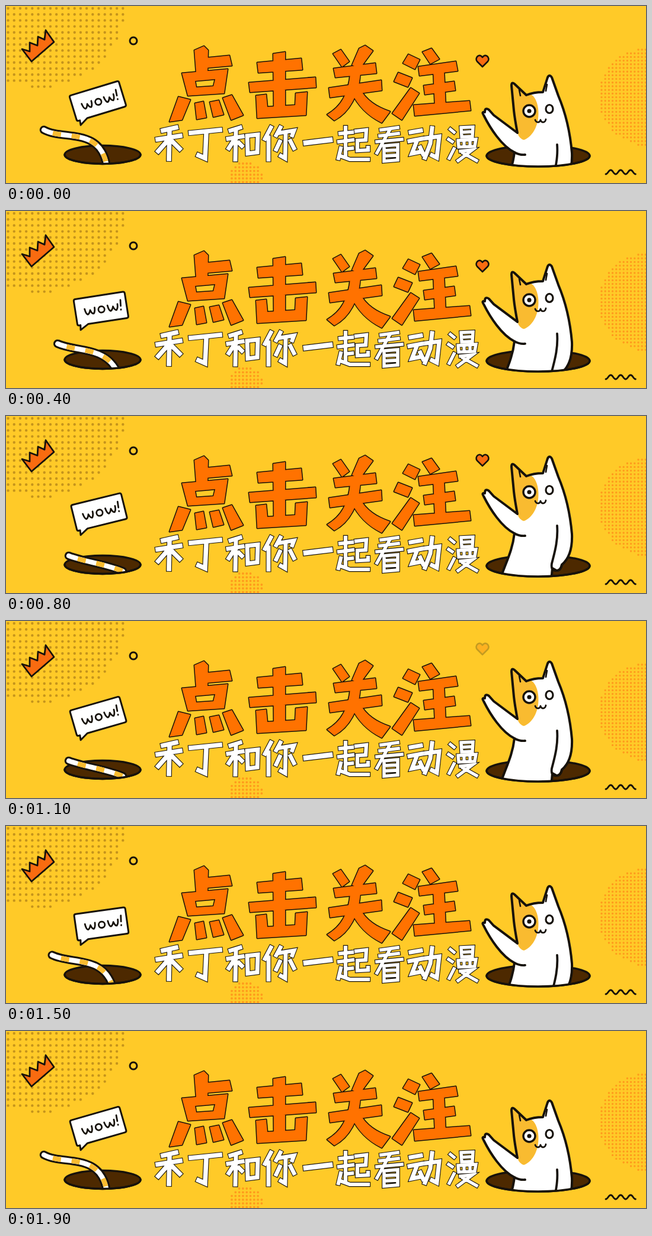
An HTML page for the animation above (2000 ms loop, 1080 px wide and 300 px high).

```html
<!DOCTYPE html>
<html lang="zh">
<head>
<meta charset="utf-8">
<title>点击关注</title>
<style>
html, body { margin: 0; width: 100%; height: 100%; overflow: hidden; background: #ffca28; }
svg { display: block; width: 1080px; height: 300px; }
.ink { fill: none; stroke: #17120b; stroke-width: 3.4; stroke-linecap: round; stroke-linejoin: round; }
.hole { fill: #4d2900; stroke: #17120b; stroke-width: 3.4; }
#title { stroke-linejoin: round; }
#line path { fill: none; stroke-linecap: square; stroke-linejoin: miter; stroke-width: calc(var(--w, 7.6px) + var(--edge)); }
.edge { --edge: 2.2px; stroke: #17120b; }
.face { --edge: 0px; stroke: #fff; }
#tail path { fill: none; stroke-linecap: round; }
</style>
</head>
<body>
<svg viewBox="0 0 1080 300" role="img" aria-label="点击关注 禾丁和你一起看动漫 wow!">
  <defs>
    <clipPath id="inLeft"><path d="M0 0H300V252H227A64 15.5 0 0 1 99 252H0Z"/></clipPath>
    <clipPath id="inRight"><path d="M780 0H1080V254H985A87 18 0 0 1 811 254H780Z"/></clipPath>
    <path id="body" d="M863 166C860 150 858 138 857 128L853 86Q853 79 858 83L878 102Q890 97 906 97L914 72Q917 66 921 72L932 103C943 129 952 165 955 200C956 225 950 242 938 252Q936 262 929 262L922 258L920 280H833C842 250 854 232 858 199C836 188 817 158 806 136Q802 130 808 131Q808 122 815 127L823 136Z"/>
    <clipPath id="inBody"><use href="#body"/></clipPath>

    <g id="title">
      <!-- 点 -->
      <path d="M318 75L334 68 341 75 340 113 321 114ZM337 88L377 84 381 101 337 105Z"/>
      <path fill-rule="evenodd" d="M297 114L374 107 368 148 307 152ZM319 127L353 124 350 136 321 138Z"/>
      <path d="M291 154L311 159 297 193 276 196ZM319 165L333 162 338 189 322 192ZM344 163L359 160 367 184 350 188ZM366 156L381 151 400 185 380 193Z"/>
      <!-- 击 -->
      <path d="M451 81L471 78 471 178 452 180ZM424 96L498 89 500 108 426 113ZM410 130L522 121 523 138 412 146Z"/>
      <path d="M422 152L439 150 441 171 488 168 489 148 508 146 506 185 424 190Z"/>
      <!-- 关 -->
      <path d="M552 81L565 74 579 94 567 103ZM596 72L606 67 619 76 597 106 584 100ZM553 106L623 97 625 114 556 121ZM545 139L633 126 634 143 547 155Z"/>
      <path d="M581 114L598 112C596 150 580 180 554 194L542 184C566 170 578 148 581 114ZM583 146L597 140C608 160 625 171 648 179L634 198C610 186 594 170 583 146Z"/>
      <!-- 注 -->
      <path d="M679 82L698 91 690 107 670 97ZM662 113L685 122 678 137 655 128ZM652 182L683 139 697 148 668 193Z"/>
      <path d="M703 78L718 72 731 90 716 98ZM696 103L759 94 762 110 698 118ZM705 135L756 128 758 143 707 150ZM721 108L739 106 742 172 724 174ZM688 168L782 161 784 177 690 186Z"/>
    </g>

    <g id="line" transform="translate(0 -3)">
      <!-- 禾丁 -->
      <path d="M265 214L287 209M256 229L294 223M276 214L275 262M271 233L257 249M281 233L293 245"/>
      <path d="M312 218L361 213M338 219L336 261 325 256"/>
      <!-- 和你一 -->
      <path style="--w:7px" d="M379 214L395 209M375 228L399 224M388 213L387 263M383 233L376 244M393 235L398 240M407 223L425 221 424 251 408 253Z"/>
      <path style="--w:6.8px" d="M447 209L437 228M443 226L443 263M463 209L456 222M462 218L486 214 483 222M472 220L471 261 464 257M462 233L456 246M480 232L486 244"/>
      <path style="--w:8.6px" d="M506 235L547 230"/>
      <!-- 起看 -->
      <path style="--w:6.2px" d="M564 219L584 217M562 233L585 230M573 209L573 257M575 245L584 244M565 244L561 261M564 257L580 263 611 263M591 215L608 213 607 230 593 231 593 248 611 247 611 243"/>
      <path style="--w:5.6px" d="M633 213L661 209M631 223L662 219M626 233L668 229M647 214L626 252M638 240L661 238 661 264 638 266ZM640 248L659 247M640 257L659 256"/>
      <!-- 动漫 -->
      <path style="--w:7px" d="M683 217L700 214M681 232L702 228M692 235L685 253 700 250M699 243L704 254M709 227L731 224 727 260 719 256M719 210L716 236 707 260"/>
      <path style="--w:5.4px" d="M750 212L756 217M747 229L753 233M748 261L756 245M768 209L788 208 787 224 769 225ZM770 217L787 216M763 231L793 229 791 241 764 242ZM773 232L773 241M783 231L783 240M767 249L787 247 763 265M771 252L794 265"/>
    </g>
  </defs>

  <rect width="1080" height="300" fill="#ffca28"/>
  <path id="dotsA" fill="#c5941c"/>
  <path id="dotsB" fill="#ff9a1c"/>
  <path id="dotsC" fill="#ff9a1c"/>

  <path class="ink" style="fill:#f96b10;stroke-width:2.8" d="M43 94L27 73 40 77 40 62 53 67 54 52 65 57 67 41 81 61Z"/>
  <circle class="ink" cx="215" cy="59" r="6" style="stroke-width:3"/>
  <path id="wave" class="ink" style="stroke-width:2.8"/>

  <use href="#title" fill="#ff7200" stroke="#17120b" stroke-width="3"/>
  <use href="#title" fill="#ff7200"/>
  <use href="#line" class="edge"/>
  <use href="#line" class="face"/>

  <g id="heart">
    <path class="ink" style="fill:#f96b10;stroke-width:2.6" d="M0 10L-9 1C-14-5-5-14 0-6C5-14 14-5 9 1Z"/>
  </g>

  <g id="bubble">
    <path class="ink" style="fill:#fff;stroke-width:3" d="M-2-53L79-53Q82-53 82-50V-11Q82-8 79-8H13L-1 0 0-8H-2Q-5-8-5-11V-50Q-5-53-2-53Z"/>
    <path class="ink" style="stroke-width:2.8" d="M11-34q1 9 4 10 3-1 5-7 2 7 5 7 3-3 3-10M50-34q1 9 4 10 3-1 5-7 2 7 5 7 3-3 3-10M73-40l-1 10m-.5 6v.5"/>
    <circle class="ink" style="stroke-width:2.8" cx="39" cy="-29" r="5.2"/>
  </g>

  <ellipse class="hole" cx="163" cy="252" rx="64" ry="15.5"/>
  <g id="tail" clip-path="url(#inLeft)">
    <path stroke="#17120b" stroke-width="14.5"/>
    <path stroke="#fff" stroke-width="8.2"/>
    <path stroke="#f9bb30" stroke-width="8.2" stroke-dasharray="0 16 14 18 14 18 14 18 14 200" style="stroke-linecap:butt"/>
  </g>
  <path class="ink" d="M99 252A64 15.5 0 0 0 227 252"/>

  <ellipse class="hole" cx="898" cy="254" rx="87" ry="18"/>
  <g clip-path="url(#inRight)">
    <g id="cat">
      <use href="#body" fill="#fff"/>
      <path clip-path="url(#inBody)" fill="#f9bb30" d="M845 75L880 98Q895 102 898 125C901 150 890 172 874 178Q866 176 863 166L850 140Z"/>
      <use href="#body" class="ink" style="stroke-width:4"/>
      <path class="ink" style="stroke-width:3.8" d="M858 199Q867 204 876 203M930 186C932 212 925 234 921 250Q919 263 929 262Q936 262 938 252"/>
      <path class="ink" style="stroke-width:2.6" d="M866 93L868 103M913 84L911 95"/>
      <circle class="ink" style="fill:#fff" cx="883" cy="129" r="10"/>
      <circle cx="883" cy="129" r="3.6" fill="#17120b"/>
      <ellipse class="ink" style="fill:#fff;stroke-width:3.2" cx="917" cy="125.500" rx="6" ry="7"/>
      <path class="ink" style="stroke-width:2.8" d="M893 144q1 4 5 4 3 0 4-4 1 4 4 4 4 0 5-5"/>
    </g>
  </g>
  <path class="ink" d="M811 254A87 18 0 0 0 985 254"/>
</svg>

<script>
const LOOP = 2000, STEP = 100;
const $ = id => document.getElementById(id);
const clamp = v => Math.min(1, Math.max(0, v));
const ease = v => (1 - Math.cos(Math.PI * clamp(v))) / 2;

// Grid of dots kept inside a circle.
function dots(id, cx, cy, radius, x0, y0, gap, r) {
  let d = '';
  for (let y = y0; y < 300; y += gap)
    for (let x = x0; x < 1080; x += gap)
      if (Math.hypot(x - cx, y - cy) < radius)
        d += `M${x - r} ${y}a${r} ${r} 0 1 0 ${2 * r} 0a${r} ${r} 0 1 0 ${-2 * r} 0`;
  $(id).setAttribute('d', d);
}
dots('dotsA', 55, -10, 148, 3.5, 4, 10.2, 2.2);
dots('dotsB', 1084, 154, 83, 1005, 74, 6.2, 1.7);
dots('dotsC', 405, 291, 27, 381, 267, 6.3, 1.9);

const hump = 'c4 0 4.400-7 8.400-7s4.400 7 8.400 7';
$('wave').setAttribute('d', 'M1012 285' + hump.repeat(3));

// Tail curve out of the hole and pulled in: tip, two handles, root.
const tailOut = [64, 210, 97, 228, 160, 205, 170, 272];
const tailIn = [106, 237, 132, 247, 165, 250, 197, 263];
const tailPaths = $('tail').querySelectorAll('path');

function draw(t) {
  const rise = t < 1200 ? ease(t / 750) : 1 - ease((t - 1200) / 490);
  $('cat').setAttribute('transform', `translate(0 ${49 * (1 - rise)})`);

  const p = tailOut.map((v, i) => v + (tailIn[i] - v) * rise);
  const d = `M${p[0]} ${p[1]}C${p.slice(2).join(' ')}`;
  tailPaths.forEach(el => el.setAttribute('d', d));

  const tilt = -12.5 - 4.5 * Math.cos(2 * Math.PI * t / 1000);
  $('bubble').setAttribute('transform', `translate(127 201.5) rotate(${tilt})`);

  const lift = Math.max(0, t - 600) * 0.092;
  $('heart').setAttribute('transform', `translate(804 ${93 - lift})`);
  $('heart').setAttribute('opacity', 1 - clamp((t - 800) / 400));
}

const start = performance.now();
function tick() {
  const t = (performance.now() - start) % LOOP;
  draw(Math.floor(t / STEP) * STEP);
  requestAnimationFrame(tick);
}
tick();
</script>
</body>
</html>
```
